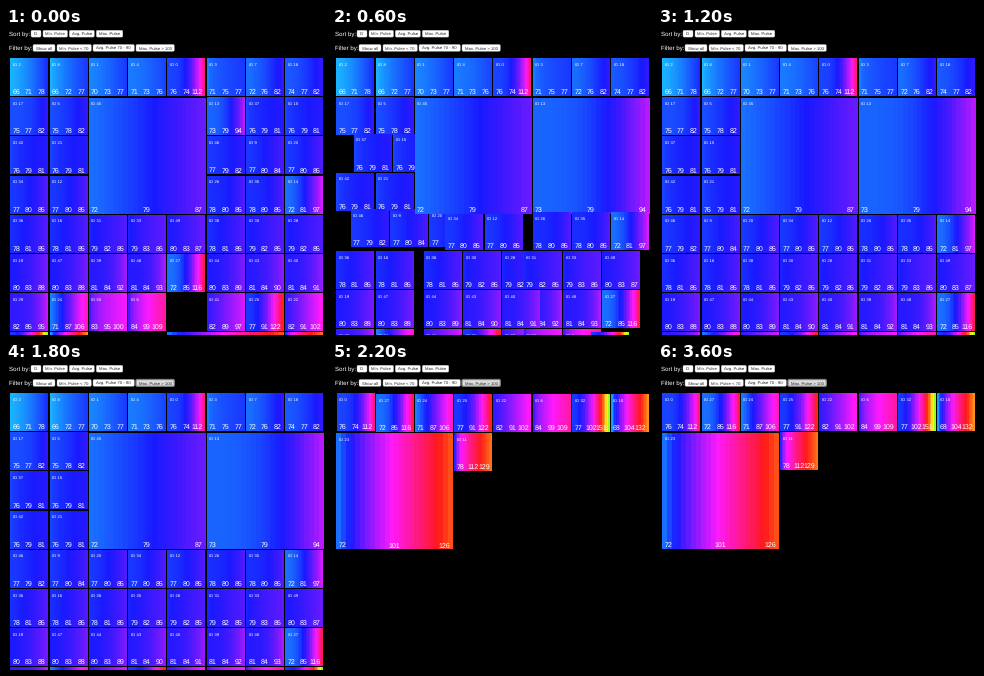
These frames come from a looping animation (320 by 307 pixels, 3.7 s). A matplotlib script:

```python
import colorsys

import matplotlib.pyplot as plt
import numpy as np
from matplotlib.animation import FuncAnimation
from matplotlib.patches import FancyBboxPatch

W, H, DPI = 320, 307, 64
FRAMES, STEP = 37, 100
COLS, PX, PY = 8, 39.3, 39.1      # grid pitch
X0, Y0, GAP = 4.2, 31, 1.8
BANDS = 24
EXPAND, PRESS, FILTER, DURATION = 333, 1700, 1830, 400   # ms

plt.rcParams["font.family"] = "Liberation Sans"
plt.rcParams["text.hinting"] = "none"

# People in order of average pulse
IDS = [2, 8, 1, 4, 0, 3, 7, 18, 17, 5, 45, 13, 37, 15, 42, 21, 46,
       9, 20, 34, 12, 26, 35, 14, 36, 16, 38, 30, 28, 31, 33, 49, 19, 47,
       44, 43, 40, 39, 48, 27, 29, 24, 41, 25, 22, 50, 6, 23, 32, 10, 11]

# Pulse trends as (rank, pulse) knots
AVG = [(0, 71), (7, 76.6), (10, 78.6), (16, 79.4), (23, 80.6), (26, 81.4),
       (29, 82.3), (38, 84.4), (40, 85), (43, 91), (44, 91), (46, 99),
       (49, 104), (50, 112)]
LOW = [(0, 66), (1, 66), (2, 70.4), (5, 71.3), (8, 74.6), (16, 76.6),
       (26, 78.4), (45, 83)]
HIGH = [(0, 78), (3, 76), (5, 77), (6, 82), (15, 81), (18, 85), (29, 85),
        (36, 91), (45, 100)]

# People whose range leaves the trend: id -> (min, max)
WIDE = {0: (76, 112), 45: (72, 87), 13: (73, 94), 14: (72, 97), 27: (72, 116),
        24: (71, 106), 25: (77, 122), 22: (82, 102), 6: (84, 109),
        23: (72, 126), 32: (77, 151), 10: (68, 132), 11: (78, 129)}


def px(size):
    return size * 72 / DPI


def trend(knots, rank):
    return round(float(np.interp(rank, *zip(*knots))))


def ease(t):
    """CSS 'ease': cubic-bezier(.25, .1, .25, 1)."""
    t = min(max(t, 0), 1)
    s = np.linspace(0, 1, 401)
    a, b, c = 3 * s * (1 - s) ** 2, 3 * s * s * (1 - s), s ** 3
    return float(np.interp(t, 0.25 * a + 0.25 * b + c, 0.1 * a + b + c))


def pulse_color(pulse):
    hue = (200 + 2.9 * (pulse - 66)) % 360 / 360
    return colorsys.hls_to_rgb(hue, 0.55, 1)


def pulse_bands(low, avg, high):
    power = np.clip((high - low) / max(avg - low, 1) - 1, 0.5, 3)
    u = np.linspace(0, 1, BANDS) ** power
    return np.array([[pulse_color(low + (high - low) * v) for v in u]])


def masonry(tiles, big):
    """Put each tile in the lowest free column group."""
    heights, spots = [0.0] * COLS, {}
    for tile in tiles:
        span = 3 if tile.id in big else 1
        tops = [max(heights[c:c + span]) for c in range(COLS - span + 1)]
        col = tops.index(min(tops))
        bottom = tops[col] + span + (0.001 if span > 1 else 0)
        heights[col:col + span] = [bottom] * span
        spots[tile.id] = np.array([X0 + col * PX, Y0 + tops[col] * PY])
    return spots


class Tile:
    def __init__(self, ax, rank, pid):
        avg = trend(AVG, rank)
        low, high = WIDE.get(pid, (trend(LOW, rank), trend(HIGH, rank)))
        self.id, self.high = pid, high
        z = 2 + pid * 0.1
        self.image = ax.imshow(pulse_bands(low, avg, high), aspect="auto",
                               interpolation="nearest", zorder=z)
        style = dict(color="white", va="baseline", clip_on=True, zorder=z + 0.05)
        self.label = ax.text(0, 0, f"ID {pid}", **style)
        self.values = [ax.text(0, 0, str(v), ha=ha, **style)
                       for v, ha in zip((low, avg, high), ("left", "center", "right"))]
        self.parts = [self.image, self.label, *self.values]

    def draw(self, pos, span, scale=1.0):
        shown = scale > 0.03
        for part in self.parts:
            part.set_visible(shown)
            part.set_alpha(scale)
        if not shown:
            return
        w, h = span * PX - GAP, span * PY - GAP
        cx, cy = pos[0] + w / 2, pos[1] + h / 2

        def place(x, y):
            return cx + (x - w / 2) * scale, cy + (y - h / 2) * scale

        left, top = place(0, 0)
        right, bottom = place(w, h)
        self.image.set_extent((left, right, bottom, top))
        self.label.set_position(place(2.6, 7))
        self.label.set_fontsize(px(4.2 * scale))
        for text, x in zip(self.values, (2.2, w / 2, w - 2)):
            text.set_position(place(x, h - 2))
            text.set_fontsize(px(7 * scale))


fig = plt.figure(figsize=(W / DPI, H / DPI), dpi=DPI, facecolor="black")
ax = fig.add_axes((0, 0, 1, 1))
ax.axis("off")

tiles = [Tile(ax, rank, pid) for rank, pid in enumerate(IDS)]
ax.set_xlim(0, W)
ax.set_ylim(H, 0)
ax.autoscale(False)


def button(x, y, width, label):
    box = FancyBboxPatch((x + 1, y + 1), width - 2, 4.8, fc="white", ec="#bbbbbb",
                         lw=px(0.4), boxstyle="round,pad=1,rounding_size=1.3")
    ax.add_patch(box)
    ax.text(x + width / 2, y + 5, label, size=px(4.3), color="#222222",
            ha="center", va="baseline")
    return box


def toolbar(title, y, buttons):
    ax.text(3, y + 5, title, size=px(6.1), color="white", va="baseline")
    return [button(x, y, width, label) for x, width, label in buttons]


toolbar("Sort by:", 2.3, [(25, 10, "ID"), (37, 24.5, "Min. Pulse"),
                          (63.3, 25, "Avg. Pulse"), (90.3, 26.5, "Max. Pulse")])
filters = toolbar("Filter by:", 16.5, [
    (27, 22, "Show all"), (51, 34.3, "Min. Pulse < 70"),
    (87, 41.3, "Avg. Pulse 70 - 90"), (130, 38.3, "Max. Pulse > 100")])

before, after = {45, 23}, {45, 23, 13}
kept = [t for t in tiles if t.high > 100]
start = masonry(tiles, before)
opened = masonry(tiles, after)
filtered = masonry(kept, after)


def update(frame):
    now = frame * STEP
    grow = ease((now - EXPAND) / DURATION)
    sift = ease((now - FILTER) / DURATION)
    big = after if now >= EXPAND else before
    for tile in tiles:
        pos = start[tile.id] + (opened[tile.id] - start[tile.id]) * grow
        scale = 1.0
        if tile.id in filtered:
            pos = pos + (filtered[tile.id] - pos) * sift
        else:
            scale = 1 - sift
        tile.draw(pos, 3 if tile.id in big else 1, scale)
    pressed = now >= PRESS
    filters[-1].set_facecolor("#dddddd" if pressed else "white")
    filters[-1].set_edgecolor("#808080" if pressed else "#bbbbbb")
    filters[-1].set_linewidth(px(1.3 if pressed else 0.4))
    return []


anim = FuncAnimation(fig, update, frames=FRAMES, interval=STEP,
                     init_func=lambda: update(0), repeat=True, repeat_delay=0)
plt.show()
```
